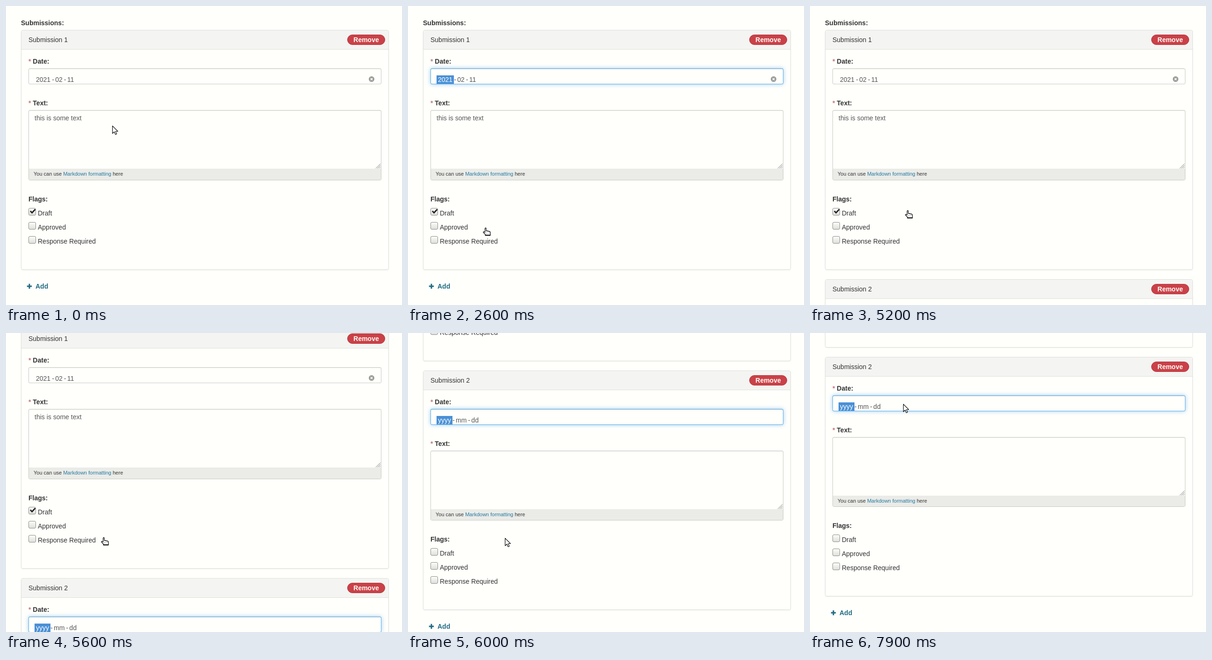
Recreate the animation shown at these times as an HTML page. Size 846 by 638 pixels, loop 8 s.

```html
<!DOCTYPE html>
<html lang="en">
<head>
<meta charset="utf-8">
<title>Repeating form</title>
<style>
html, body { margin: 0; width: 100%; height: 100%; overflow: hidden; background: #fffffc; }
#stage { position: absolute; left: 0; top: 0; width: 846px; height: 638px; overflow: hidden;
  font: 14px/20px "Liberation Sans", Arial, sans-serif; color: #333; }
#stage div, #stage svg { position: absolute; box-sizing: border-box; }
#page { left: 0; top: 0; width: 846px; }
.t { white-space: pre; }
.b { font-weight: bold; }
.star { color: #c6777a; }
.card { left: 32px; width: 786px; border: 1px solid #dededb; border-radius: 4px; box-shadow: 0 1px 2px rgba(0,0,0,.07); }
.head { left: 0; top: 0; width: 784px; height: 41px; background: #f4f4f2; border-bottom: 1px solid #dededb; border-radius: 3px 3px 0 0; }
.remove { left: 729px; width: 81px; height: 22px; border-radius: 11px; background: #ca4148; border: 1px solid #b9333b;
  color: #fffdf8; font-weight: bold; line-height: 20px; text-align: center; }
.field { left: 48px; width: 754px; border: 1px solid #c9c9c6; border-radius: 3px; box-shadow: inset 0 1px 1px rgba(0,0,0,.075); }
.glow { left: 48px; width: 754px; height: 34px; border: 1px solid rgba(82,168,236,.85); border-radius: 3px;
  box-shadow: inset 0 1px 1px rgba(0,0,0,.075), 0 0 8px rgba(82,168,236,.6); }
.foot { left: 0; bottom: 0; width: 752px; background: #ebebe8; }
.value { color: #555; }
.pick { background: #4a90d6; height: 18px; left: 61px; }
.help { font-size: 11px; }
.help span { color: #227a9f; }
.box { left: 48px; width: 16px; height: 16px; border: 1px solid #8d8d8b; border-radius: 3px; background: linear-gradient(#fbfbf8, #dfdfdc); }
.box.down { background: linear-gradient(#d2d2cf, #e2e2df); }
.add { color: #206b82; }
.add.over { color: #123f4d; }
#popup { left: 51px; top: 166px; }
.day { width: 33px; height: 25px; font-size: 12px; line-height: 25px; text-align: center; }
</style>
</head>
<body>
<div id="stage"><div id="page"></div><svg id="cursor" width="20" height="22" style="overflow:visible"></svg></div>
<script>
const $ = id => document.getElementById(id);
const text = (x, baseline, s, cls = '') =>
  `<div class="t ${cls}" style="left:${x}px;top:${baseline - 15}px">${s}</div>`;
const svg = (x, y, w, h, body, extra = '') =>
  `<svg ${extra} style="left:${x}px;top:${y}px" width="${w}" height="${h}" fill="none">${body}</svg>`;

const required = s => `<span class="star">* </span>${s}`;
const tick = (id, y) => svg(48, y, 18, 16,
  '<path d="M4 6.5 7.6 10.2 14.5 2.8" stroke="#222" stroke-width="2.8"/>', `id="${id}"`);

function dateValue(y, parts, color) {
  const spans = parts.map((p, i) =>
    i ? `<tspan dx="3">-</tspan><tspan dx="2.34">${p}</tspan>` : `<tspan ${color}>${p}</tspan>`);
  return svg(64, y, 120, 17, `<text y="14" fill="#555">${spans.join('')}</text>`);
}

function card(n, top, parts, content, trim, pickWidth) {
  const y = v => top + v, low = v => top + v - trim;
  const flags = ['Draft', 'Approved', 'Response Required'].map((name, i) =>
    `<div class="box" id="box${n}${i}" style="top:${low(380 + 30 * i)}px"></div>` +
    text(68, low(396 + 30 * i), name)).join('');
  return `<div class="card" style="top:${top}px;height:${512 - trim}px"><div class="head"></div></div>
    ${text(48, y(26), 'Submission ' + n)}
    <div class="remove" style="top:${y(10)}px">Remove</div>
    ${text(48, y(72), required('Date:'), 'b')}
    <div class="field" style="top:${y(82)}px;height:34px"></div>
    <div class="glow" id="glow${n}" style="top:${y(82)}px"></div>
    <div class="pick" id="pick${n}" style="top:${y(97)}px;width:${pickWidth}px"></div>
    ${dateValue(y(97), parts, `id="year${n}"`)}
    ${text(48, y(161), required('Text:'), 'b')}
    <div class="field" style="top:${y(171)}px;height:${150 - trim}px">
      <div class="foot" style="height:${24 - trim}px"></div></div>
    ${svg(789, y(284), 12, 12, '<path d="M1 11.5 11 1.5M4.5 11.5 11 5M8 11.5 11 8.5" stroke="#777"/>')}
    ${text(61, y(193), content, 'value')}
    <div class="t help" style="left:59px;top:${y(297)}px">You can use <span>Markdown formatting</span> here</div>
    ${text(48, low(366), 'Flags:', 'b')}${flags}`;
}

function calendar() {
  const first = new Date(2021, 0, 31), start = first.getDate();
  let out = text(82, 40, 'February 2021', 'b') +
    svg(16, 28, 226, 16, '<path d="M7 4 3 8l4 4M219 4l4 4-4 4" stroke="#777" stroke-width="1.5"/>');
  const cell = (col, y, s, color, back = 'none') =>
    `<div class="day" style="left:${11 + 33 * col}px;top:${y}px;color:${color};background:${back}">${s}</div>`;
  ['Sun', 'Mon', 'Tue', 'Wed', 'Thu', 'Fri', 'Sat'].forEach((d, i) => out += cell(i, 51, d, '#6c6c6c'));
  for (let i = 0; i < 42; i++) {
    const d = new Date(2021, 0, start + i), inside = d.getMonth() === 1, col = i % 7;
    const weekend = col === 0 || col === 6, chosen = inside && d.getDate() === 11;
    const color = chosen ? '#fff' : weekend ? (inside ? '#da4e44' : '#ff988f') : inside ? '#222' : '#999';
    out += cell(col, 77 + 25 * (i / 7 | 0), d.getDate(), color, chosen ? '#0996f8' : 'none');
  }
  return out;
}

const popup = `<div id="popup">
  ${svg(-4, 0, 262, 246, `<path d="M4.500 9.500H10.500L20 .8 29.500 9.500H256.500V237.500H4.500Z" fill="#fffffc" stroke="#b4b4b0"
    style="filter:drop-shadow(0 1px 1px rgba(0,0,0,.15))"/>`)}
  <div id="loading">${svg(11, 20, 231, 207, `<path d="M0 0H231V207H0Z" fill="#e7e7e3"/>
    <rect x="96.500" y="10.500" width="39" height="5" rx="2.500" fill="#ecece8" stroke="#aaaaa6"/>
    <path d="M117.500 18.500 122 23l4.500-4.500" stroke="#777" stroke-width="1.400"/>`)}</div>
  <div id="calendar">${calendar()}</div></div>`;

const plus = y => svg(44, y, 12, 12, '<path d="M6 .8V11.200M.8 6H11.200" stroke="currentColor" stroke-width="3"/>');
const add = `<div class="add" id="add">${plus(0)}${text(63, 11, 'Add', 'b')}</div>`;

$('page').innerHTML = text(32, 41, 'Submissions:', 'b') +
  card(1, 51, ['2021', '02', '11'], 'this is some text', 0, 37) +
  svg(774, 149, 14, 14, '<circle cx="7" cy="7" r="6" fill="#9b9b98"/><path d="M4.700 4.700l4.600 4.600m0-4.600-4.600 4.600" stroke="#fff" stroke-width="1.500"/>') +
  tick('tick0', 431) + tick('tick1', 461) +
  `<div id="second">${card(2, 583, ['yyyy', 'mm', 'dd'], '', 1, 34)}</div>` + add + popup;
$('year2').setAttribute('fill', '#fff');

// Each shape is drawn around its hot spot at 0,0.
const shapes = {
  arrow: '<path d="M.5.8V17L4.300 13.500 6.800 19.200 9.500 18 7 12.500H12Z" fill="#fff" stroke="#111" stroke-width="1.200" stroke-linejoin="round"/>',
  hand: `<path d="M.5 9V1Q.5-.5 1.800-.5 3 -.5 3 1V5.500L10 7Q11.800 7.500 11.800 9V15.500H1V13L-2.800 9.500Q-3.800 8-2 7.500L.5 9Z"
    fill="#fff" stroke="#111" stroke-width="1.300" stroke-linejoin="round"/><path d="M3 10.500H10" stroke="#333" stroke-dasharray="1 2"/><path d="M1 14.500H12" stroke="#111"/>`,
  beam: '<path d="M-3.500-7.500H-1L0-6.500 1-7.500H3.500M0-7V8M-3.500 8.500H-1L0 7.500 1 8.500H3.500" fill="none" stroke="#222" stroke-width="1.200"/>'
};

// Tables of [start ms, ...state]; each state holds until the next.
const pointer = [
  [0, 'arrow', 227, 255], [200, 'beam', 230, 256], [400, 'beam', 224, 246], [500, 'beam', 209, 224],
  [600, 'arrow', 190, 186], [700, 'arrow', 182, 173], [900, 'arrow', 179, 165], [1000, 'arrow', 178, 160],
  [1700, 'arrow', 178, 190], [1800, 'arrow', 178, 250], [1900, 'arrow', 178, 325], [2000, 'arrow', 177, 395],
  [2100, 'arrow', 176, 440], [2200, 'arrow', 176, 465], [2400, 'hand', 168, 477], [2600, 'hand', 164, 474],
  [3200, 'hand', 162, 475], [3300, 'hand', 159, 476], [3800, 'arrow', 135, 515], [3900, 'arrow', 85, 570],
  [4000, 'hand', 60, 591], [4200, 'hand', 66, 598], [4300, 'hand', 68, 605], [4800, 'arrow', 90, 590],
  [4900, 'arrow', 130, 540], [5000, 'arrow', 170, 485], [5100, 'arrow', 198, 450], [5200, 'hand', 207, 437],
  [5700, 'arrow', 207, 437], [6400, 'hand', 207, 437], [7200, 'arrow', 206, 426], [7300, 'arrow', 205, 385],
  [7400, 'beam', 206, 320], [7500, 'beam', 205, 250], [7600, 'arrow', 200, 190], [7700, 'arrow', 199, 153],
  [7900, 'arrow', 199, 151]
];
const focus = [[0, 0], [1300, .65], [1500, 1], [2700, .3], [3000, 0]];
const scroll = [[0, 0], [5600, 60], [5700, 215], [5800, 355], [5900, 445], [6000, 503], [6100, 529], [6400, 532]];
const approved = [[0, ''], [2700, 'down'], [3000, 'on'], [3600, 'on down'], [3800, '']];

const at = (table, t) => table.findLast(row => row[0] <= t).slice(1);
const within = (t, a, b) => t >= a && t < b;
const show = (id, on) => $(id).style.display = on ? '' : 'none';
let shape = '';

function draw(t) {
  const [kind, x, y] = at(pointer, t), [flag] = at(approved, t);
  if (kind !== shape) $('cursor').innerHTML = shapes[shape = kind];
  $('cursor').style.transform = `translate(${x}px,${y}px)`;
  $('page').style.transform = `translateY(${-at(scroll, t)[0]}px)`;

  const picked = within(t, 1300, 2700);
  $('glow1').style.opacity = at(focus, t)[0];
  show('pick1', picked);
  $('year1').setAttribute('fill', picked ? '#fff' : '#555');
  show('popup', within(t, 1500, 2300));
  show('loading', t < 1600);
  show('calendar', t >= 1600);

  $('box11').className = 'box' + (flag.includes('down') ? ' down' : '');
  show('tick1', flag.includes('on'));
  const doubled = t >= 4700;
  show('second', doubled);
  $('add').style.top = (doubled ? 1123 : 592) + 'px';
  $('add').className = 'add' + (within(t, 4200, 4700) ? ' over' : '');
}

const begin = performance.now();
function frame() {
  draw((performance.now() - begin) % 8000);
  requestAnimationFrame(frame);
}
frame();
</script>
</body>
</html>
```
